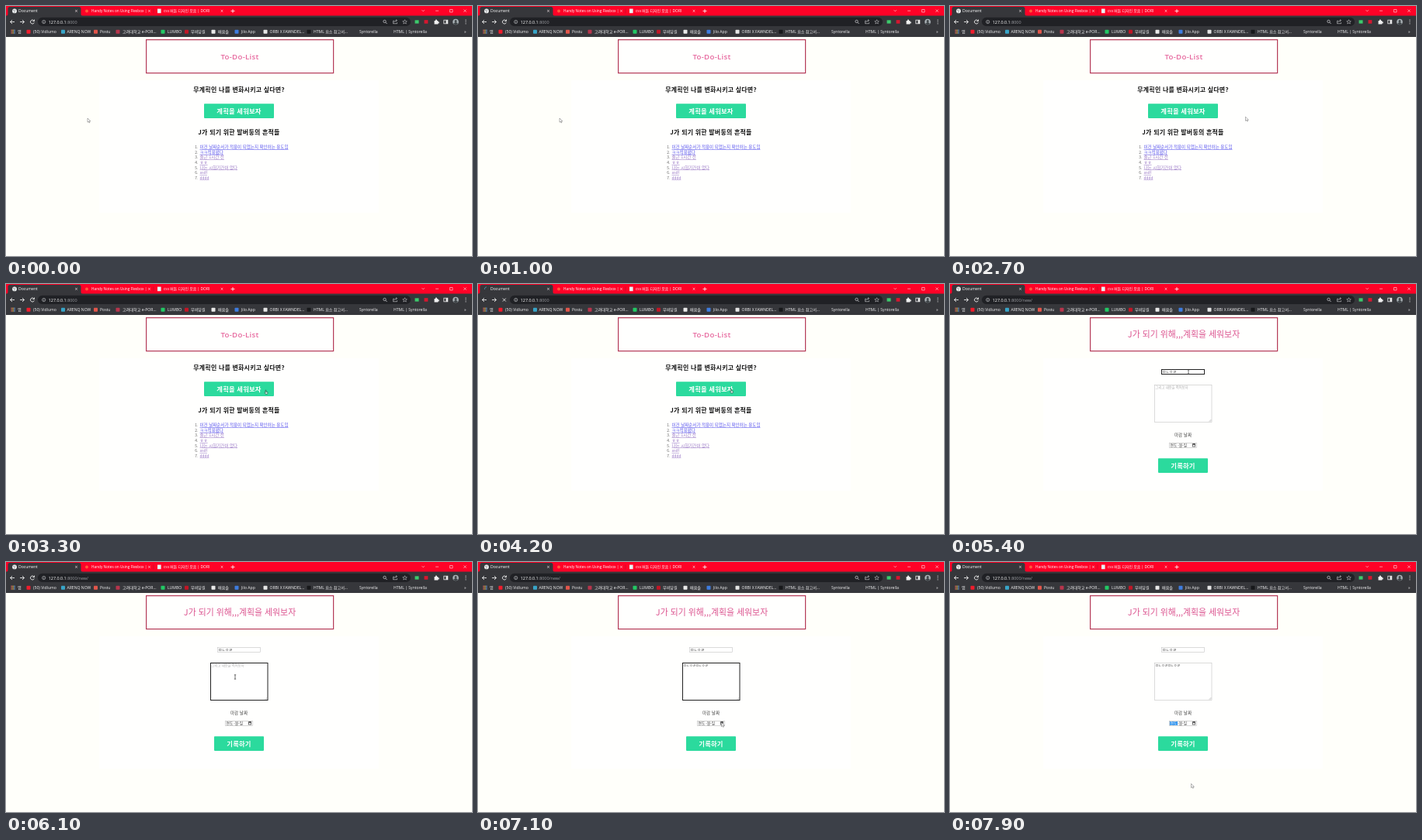
An HTML page for the animation above (8 s loop, 600 by 323 pixels).

```html
<!DOCTYPE html>
<html lang="ko">
<head>
<meta charset="utf-8">
<title>To-Do-List</title>
<style>
  html, body { margin: 0; width: 100%; height: 100%; overflow: hidden; background: #fffffa; }
  svg { display: block; width: 100%; height: 100%; }
  text { font-family: 'Noto Sans CJK KR', 'Noto Sans CJK JP', 'Noto Sans CJK', 'Noto Sans', sans-serif; white-space: pre; }
  .ui text { font-family: 'Open Sans', 'Noto Sans CJK KR', 'Noto Sans CJK JP', 'Noto Sans CJK', sans-serif; }
  .latin { font-family: 'Open Sans', 'Noto Sans', sans-serif; }
</style>
</head>
<body>
<svg id="stage" viewBox="0 0 600 323" preserveAspectRatio="none"></svg>
<script>
const LOOP = 8000, STEP = 100;
const PINK = '#e76a9f', GREEN = '#2bda9d', BAR = '#36373b', ICON = '#d4d5d8';
const stage = document.getElementById('stage');

function add(parent, tag, attrs, text) {
  const el = document.createElementNS('http://www.w3.org/2000/svg', tag);
  for (const k in attrs) el.setAttribute(k, attrs[k]);
  if (text !== undefined) el.textContent = text;
  parent.appendChild(el);
  return el;
}
const group = (parent, attrs = {}) => add(parent, 'g', attrs);
const box = (g, x, y, width, height, fill, more = {}) => add(g, 'rect', { x, y, width, height, fill, ...more });
const dot = (g, cx, cy, r, fill, more = {}) => add(g, 'circle', { cx, cy, r, fill, ...more });
const line = (g, d, stroke = ICON, width = 0.8, more = {}) =>
  add(g, 'path', { d, stroke, 'stroke-width': width, fill: 'none', ...more });
const label = (g, x, y, size, fill, text, more = {}) =>
  add(g, 'text', { x, y, 'font-size': size, fill, ...more }, text);
const middle = (g, x, y, size, fill, text, weight = 400, more = {}) =>
  label(g, x, y, size, fill, text, { 'text-anchor': 'middle', 'font-weight': weight, ...more });
const show = (el, on) => el.setAttribute('display', on ? 'inline' : 'none');
const cross = (x, y, r) => `M${x - r} ${y - r}l${2 * r} ${2 * r}m0 ${-2 * r}l${-2 * r} ${2 * r}`;

// Browser frame
const ui = group(stage, { class: 'ui' });
box(ui, 0, 0, 600, 13, '#ff0227');
add(ui, 'path', { d: 'M0 13Q2.500 13 2.500 10V3.500Q2.500 1 5 1H94Q96.500 1 96.500 3.500V10Q96.500 13 99 13Z', fill: BAR });
box(ui, 0, 12.5, 600, 27.5, BAR);
box(ui, 41, 14.8, 480, 11.2, '#202125', { rx: 5.6 });

const globe = group(ui);
dot(globe, 11, 6.4, 2.9, '#f1f3f4');
line(globe, 'M9 5.200l2 .8 1.500-1M9.800 8.200l2-.8', '#6b6d72', 0.7);
const spinner = group(ui);
line(spinner, 'M11 3.900A2.500 2.500 0 0 0 8.600 7', '#5fa6c4', 0.7);

label(ui, 16, 8.4, 5.1, '#fff', 'Document');
dot(ui, 104, 6.4, 2, '#ff5a3c');
label(ui, 110, 8.4, 4.75, '#fff', 'Handy Notes on Using Flexbox |');
box(ui, 195, 3.6, 4.6, 5.6, '#e8f4f4');
label(ui, 203, 8.4, 4.9, '#fff', 'css 버튼 디자인 모음 | DORI');
[90.5, 184.5, 278].forEach(x => line(ui, cross(x, 6.4, 1.3), '#fbeaec', 0.7));
line(ui, 'M189.500 3.500v6', '#b3122b', 0.5);
line(ui, 'M292 4v5m-2.500-2.500h5', '#fff', 0.8);
line(ui, 'M535.500 5.200l1.700 1.700 1.700-1.700M553 6.200h4M571.500 4.500h3.500v3.500h-3.500z' + cross(591, 6.2, 1.7), '#ffe3e6', 0.6);

const NAV = '#eceded';
line(ui, 'M11 20.500H5.500m2.500-2.500l-2.500 2.500 2.500 2.500', NAV, 0.9);
line(ui, 'M18 20.500h5.500m-2.500-2.500l2.500 2.500-2.500 2.500', NAV, 0.9);
const reload = line(ui, 'M35.800 18.800A2.500 2.500 0 1 0 36.300 21.400M36.500 17.500v2.100h-2.100', NAV, 0.9);
const stop = line(ui, cross(33.8, 20.5, 2), NAV, 0.9);

dot(ui, 48.7, 20.5, 2.1, 'none', { stroke: ICON, 'stroke-width': 0.6 });
line(ui, 'M48.700 19.200v.5m0 .6v1.500', ICON, 0.6);
const url = label(ui, 54.7, 22.5, 5.45, '#fff', '127.0.0.1');
const path = add(url, 'tspan', { fill: '#9a9ca1' }, '');

dot(ui, 487.5, 19.9, 1.7, 'none', { stroke: ICON, 'stroke-width': 0.7 });
line(ui, 'M488.800 21.200l1.800 1.800');
line(ui, 'M500 19.200h-1.500v3.500h5V21.200m-3.500 0q.2-2.500 3.200-2.500m-1.200-1.300l1.500 1.300-1.500 1.300', ICON, 0.6);
add(ui, 'path', { d: 'M513.500 17.700l.8 1.900 2 .1-1.600 1.300.6 2-1.800-1.100-1.800 1.100.6-2-1.600-1.300 2-.1z', fill: 'none', stroke: ICON, 'stroke-width': 0.5 });
box(ui, 526.5, 18.3, 5, 4.3, '#3ccb6c');
box(ui, 538.5, 18.1, 4.8, 4.6, '#d5172f');
add(ui, 'path', { d: 'M551.500 19h1.500a1 1 0 1 1 1.800 0h1.500v1.500a1 1 0 1 1 0 1.800v1.200h-4.800z', fill: '#f1f1f1' });
box(ui, 563.8, 18.2, 5, 4.6, 'none', { stroke: '#eee', 'stroke-width': 0.8 });
box(ui, 566.5, 18.2, 2.3, 4.6, '#eee');
dot(ui, 579, 20.5, 3.8, '#a9b1b5');
dot(ui, 579, 19.5, 1.5, '#3d4245');
add(ui, 'path', { d: 'M576 23q3-4 6 0q-3 2.300-6 0z', fill: '#3d4245' });
[18.2, 20.5, 22.8].forEach(y => dot(ui, 592, y, 0.6, '#eee'));

// Bookmarks: icon x, icon colour, text x, text
for (let i = 0; i < 9; i++)
  box(ui, 6.5 + i % 3 * 1.9, 30.6 + Math.floor(i / 3) * 1.9, 1.3, 1.3, ['#e46a5e', '#e9bd4c', '#6a9fe0'][i % 3]);
[
  [0, '', 15, '앱'],
  [29, '#f01d2c', 35, '(50) Vidlumo'],
  [73.5, '#38a5c8', 78.5, 'ARENQ NOW'],
  [115.5, '#e2564b', 121, 'Postu'],
  [144, '#b8354c', 150, '고려대학교 e-POR...'],
  [202, '#22c864', 208, 'LUMBO'],
  [232.5, '#c01626', 238, '무비담길'],
  [267, '#e9e9e9', 273, '배움솔'],
  [297, '#3e7de0', 303, 'Jilo App'],
  [334, '#e6e6e6', 339.5, 'ORBI X FAWNDEL...'],
  [390, '#17181a', 396, 'HTML 요소 참고서...'],
  [0, '', 455, 'Syntorella'],
  [0, '', 499, 'HTML | Syntorella'],
  [0, '', 590, '»']
].forEach(([ix, color, tx, text]) => {
  if (color) box(ui, ix - 2.5, 30.7, 5, 5, color, { rx: 0.8 });
  label(ui, tx, 35.1, 5.1, '#f4f4f5', text);
});

// Shared page layout
box(stage, 0, 40, 600, 283, '#fffffa');
box(stage, 120, 96, 360, 171, '#fffffe');
box(stage, 180.6, 43.6, 241, 43, '#fffffe', { stroke: '#b53a58', 'stroke-width': 1.2 });

function button(g, x, y, w, text) {
  box(g, x, y, w, 18.6, GREEN, { rx: 0.8 });
  middle(g, x + w / 2, y + 12.3, 8.3, '#fff', text, 700, { 'letter-spacing': 0.2 });
}

// List page
const home = group(stage);
middle(home, 301, 69.2, 9.7, PINK, 'To-Do-List', 600, { class: 'latin', 'letter-spacing': 0.25 });
const heading = { 'letter-spacing': 0.25 };
middle(home, 300, 111, 7.95, '#111', '무계획인 나를 변화시키고 싶다면?', 700, heading);
button(home, 255, 126.3, 90, '계획을 세워보자');
middle(home, 300, 165.8, 7.95, '#111', 'J가 되기 위한 발버둥의 흔적들', 700, heading);
[
  '이건 날짜순서가 적용이 되었는지 확인하는 용도임', 'ㅋㅋ적용됐다', '출근 1시간 전',
  'ㅎㅎ', '나는 시험기간이 없다', 'asdf', 'dddd'
].forEach((text, i) => {
  const y = 184.3 + i * 6.55;
  label(home, 247.4, y, 5, '#666', `${i + 1}.`, { 'text-anchor': 'end' });
  label(home, 249.5, y, i > 4 ? 4.8 : 5.5, i < 2 ? '#5853ee' : '#9a78c6', text, { 'font-weight': 300 });
});
home.querySelectorAll('[font-weight="300"]').forEach(el => {
  el.style.textDecoration = 'underline 0.35px';
  el.style.textUnderlineOffset = '0.6px';
});

// Form page
const form = group(stage);
middle(form, 301, 69.3, 10.9, '#dc5590', 'J가 되기 위해,,,계획을 세워보자');
const title = box(form, 272.5, 110.5, 55, 6, '#fff');
const titleText = label(form, 273.6, 115.4, 4.9, '#333', '');
const body = box(form, 263.5, 130.5, 73.5, 48, '#fff');
const bodyText = label(form, 264.6, 135, 4.3, '#333', '');
line(form, 'M333.800 177.600l2.400-2.400m-1 2.400l1-1', '#888', 0.5);
middle(form, 300, 197.3, 5.6, '#444', '마감 날짜');
box(form, 282.5, 205.5, 35, 6, '#fff', { stroke: '#bbb', 'stroke-width': 0.6 });
const picked = box(form, 283, 206, 10, 5, '#2f93ee');
const year = label(form, 283.6, 210.2, 4.7, '#333', '연도');
label(form, 293.2, 210.2, 4.7, '#333', '-월-일');
box(form, 312.5, 206.8, 3.2, 3.2, 'none', { stroke: '#222', 'stroke-width': 0.6 });
box(form, 312.5, 206.4, 3.2, 1.2, '#222');
button(form, 268, 225.3, 64, '기록하기');

// Pointers, hot spot at 0,0
const pointer = group(stage);
const arrow = add(pointer, 'path', { d: 'M0 0V5.200L1.300 4.100 2.100 5.900 3 5.500 2.200 3.800H3.900Z', fill: '#fff', stroke: '#555', 'stroke-width': 0.45 });
const hand = add(pointer, 'path', { d: 'M-.4 0H.4V2L2.400 2.500V4L1.900 5.200H-.2L-1.500 3.200-.8 2.800-.4 3.200Z', fill: '#c9f2e3', stroke: '#1d4a3a', 'stroke-width': 0.6 });
const beam = line(pointer, 'M-1.200-2.700H1.200M0-2.700V2.700M-1.200 2.700H1.200', '#333', 0.7);

// time, x, y
const route = [
  [2100, 105, 145], [2300, 270, 152], [2500, 472, 136], [2700, 380.5, 143.2],
  [3000, 343, 138.5], [3600, 326, 135.8], [4400, 326, 135.8], [4700, 307, 113.5],
  [5500, 307, 113.5], [5900, 295, 148.5], [6700, 295, 148.5], [7100, 313.5, 207.5],
  [7300, 313.5, 207.5], [7900, 310.5, 286.5]
];
function pointerAt(t) {
  const i = route.findIndex(p => p[0] > t);
  if (i === 0) return route[0].slice(1);
  if (i < 0) return route[route.length - 1].slice(1);
  const [t0, x0, y0] = route[i - 1], [t1, x1, y1] = route[i];
  const p = (t - t0) / (t1 - t0), e = p * p * (3 - 2 * p);
  return [x0 + (x1 - x0) * e, y0 + (y1 - y0) * e];
}

function field(rect, text, focused, value, hint) {
  rect.setAttribute('stroke', focused ? '#222' : '#c4c4c4');
  rect.setAttribute('stroke-width', focused ? 1 : 0.6);
  text.textContent = value || hint;
  text.setAttribute('fill', value ? '#333' : '#aaa');
}
const typed = (text, t, start, gap) => text.slice(0, Math.max(0, Math.floor((t - start) / gap) + 1));

function draw(t) {
  const loading = t >= 4000 && t < 4300, onForm = t >= 4300;
  show(globe, !loading);
  show(reload, !loading);
  show(spinner, loading);
  show(stop, loading);
  path.textContent = onForm ? ':8000/new/' : ':8000';
  show(home, !onForm);
  show(form, onForm);

  field(title, titleText, t >= 4800 && t < 5900, typed('ㅁㄴㅇㄹ', t, 5100, 100), '무슨 계획을 세웠나');
  field(body, bodyText, t >= 5900 && t < 7200, typed('ㅁㄴㅇㄹㅁㄴㅇㄹ', t, 6300, 50), '그리고 내용을 적어보자');
  show(picked, t >= 7200);
  year.setAttribute('fill', t >= 7200 ? '#fff' : '#333');

  const [x, y] = pointerAt(t);
  const onButton = !onForm && x < 345 && x > 255 && y > 126 && y < 145;
  const onText = onForm && (y < 118 || (y > 130 && y < 179));
  show(hand, onButton);
  show(beam, onText);
  show(arrow, !onButton && !onText);
  pointer.setAttribute('transform', `translate(${x.toFixed(2)} ${y.toFixed(2)})`);
}

const start = performance.now();
function tick(now) {
  const t = Math.max(0, now - start) % LOOP;
  draw(Math.floor(t / STEP) * STEP);
  requestAnimationFrame(tick);
}
draw(0);
requestAnimationFrame(tick);
</script>
</body>
</html>
```
